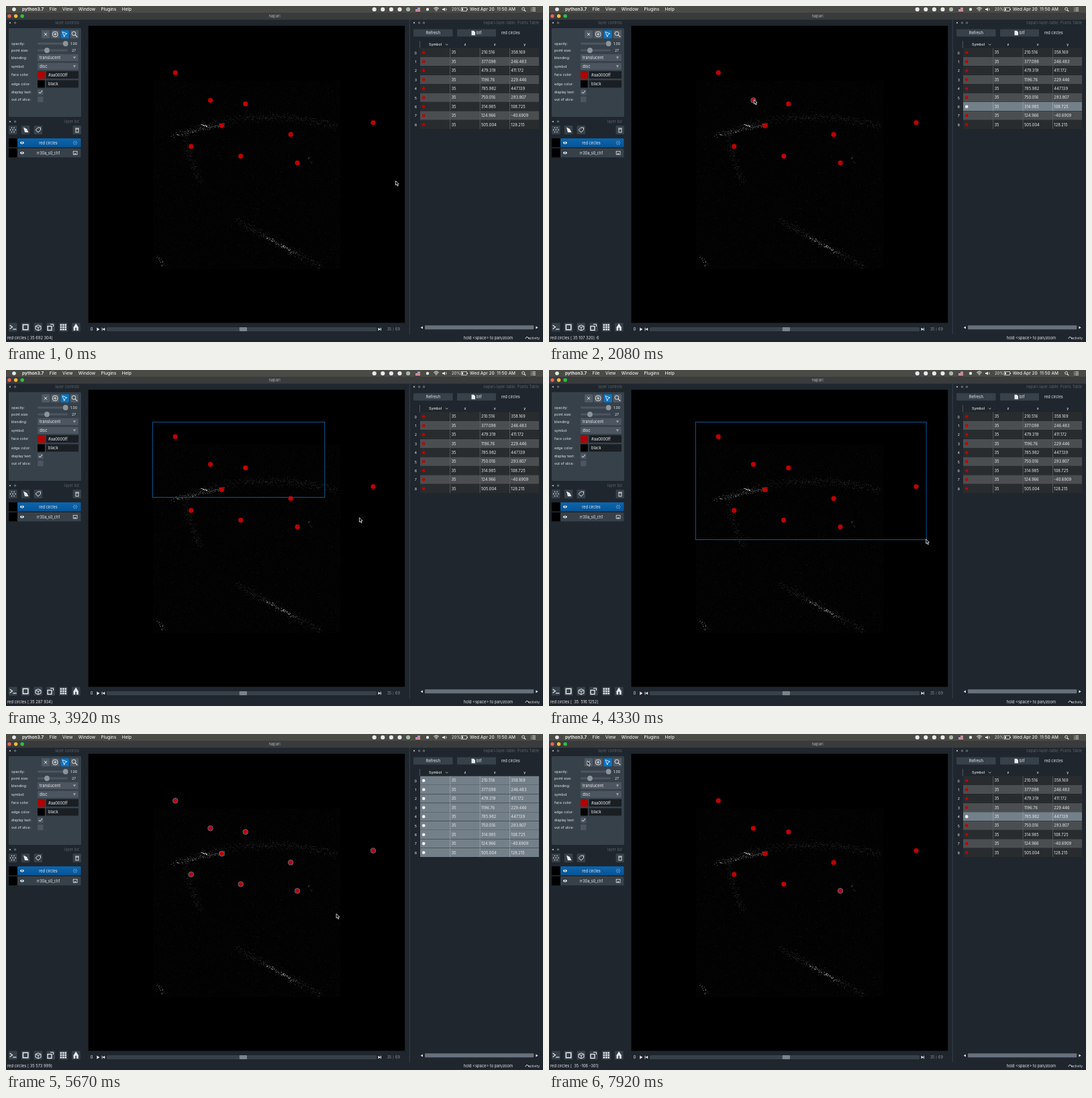
An HTML page with a canvas for the animation above (8 s loop, 800x500 px).

```html
<!DOCTYPE html>
<html lang="en">
<head>
<meta charset="utf-8">
<title>Points table</title>
<style>
html, body { margin: 0; width: 100%; height: 100%; overflow: hidden; background: #000; }
canvas { display: block; width: 800px; height: 500px; }
</style>
</head>
<body>
<canvas id="stage" width="800" height="500"></canvas>
<script>
const LOOP = 8000, TICK = 1000 / 12;
const BG = '#1f262d', PANEL = '#37414a', FIELD = '#4d5660', WHITE = '#e8eaec', DIM = '#5b636c', RED = '#c00000';
const FONT = 'Inter, "Open Sans", sans-serif';
const base = document.createElement('canvas');
base.width = 800;
base.height = 500;
let g = base.getContext('2d');

// x and y in image units; the row number is the index
const points = [
  [210.516, 358.169], [377.098, 246.483], [479.319, 411.172], [1196.76, 229.446], [785.982, 447.139],
  [750.016, 293.807], [314.985, 108.725], [124.966, -40.6909], [505.004, 128.215]
];
const SCALE = 0.275, OX = 217.9, OY = 110.6;
const toScreen = ([x, y]) => [OX + x * SCALE, OY + y * SCALE];

const smooth = u => u * u * (3 - 2 * u);
const easeOut = power => u => 1 - (1 - u) ** power;
const fling = [easeOut(4.069), easeOut(3.036)];

// pointer moves: first tick, last tick, target x and y, easing per axis
const START = [301.5, 300.9];
const moves = [
  [-1, 0, 581, 260.8],
  [0, 4, 570, 236],
  [7, 14, 424.5, 192],
  [17, 24, 305.9, 140],
  [31, 39, 218.4, 77.5],
  [44, 51, 562.2, 252.5, fling],
  [60, 67, 492.6, 268.2],
  [70, 77, 441.75, 237.9],
  [77, 80, 434, 233.5],
  [82, 89, 135.1, 81.45],
  [89, 95, 57.5, 40.8, fling]
];
const ALL = points.map((_, i) => i);
const selections = [[0, []], [14, [5]], [24, [6]], [39, []], [57, ALL], [72, []], [82, [4]]];

function rect(x, y, w, h, color, r = 0) {
  g.fillStyle = color;
  g.beginPath();
  g.roundRect(x, y, w, h, r);
  g.fill();
}

function frameRect(x, y, w, h, color = WHITE, width = 1) {
  g.strokeStyle = color;
  g.lineWidth = width;
  g.strokeRect(x, y, w, h);
}

function disc(x, y, r, color = WHITE) {
  g.fillStyle = color;
  g.beginPath();
  g.arc(x, y, r, 0, 7);
  g.fill();
}

function ring(x, y, r, color = WHITE, width = 0.9, from = 0, to = 7) {
  g.strokeStyle = color;
  g.lineWidth = width;
  g.beginPath();
  g.arc(x, y, r, from, to);
  g.stroke();
}

function trace(pts, closed) {
  g.beginPath();
  for (let i = 0; i < pts.length; i += 2) g.lineTo(pts[i], pts[i + 1]);
  if (closed) g.closePath();
}

function line(pts, color = WHITE, width = 0.9, closed = false) {
  trace(pts, closed);
  g.strokeStyle = color;
  g.lineWidth = width;
  g.stroke();
}

function poly(pts, color = WHITE) {
  trace(pts, true);
  g.fillStyle = color;
  g.fill();
}

// isosceles triangle around a centre; dx, dy give the direction of the tip
function arrow(x, y, dx, dy, size, color = WHITE) {
  const px = -dy * size * 1.25, py = dx * size * 1.25;
  dx *= size;
  dy *= size;
  poly([x + dx, y + dy, x - dx + px, y - dy + py, x - dx - px, y - dy - py], color);
}

function cross(x, y, r, color = WHITE) {
  line([x - r, y - r, x + r, y + r], color);
  line([x - r, y + r, x + r, y - r], color);
}

function lens(x, y, r) {
  ring(x, y, r);
  line([x + r * 0.7, y + r * 0.7, x + r * 1.8, y + r * 1.8], WHITE, 1.1);
}

function text(s, x, y, size = 5.8, color = WHITE, align = 'left', weight = 400) {
  g.font = `${weight} ${size}px ${FONT}`;
  g.textAlign = align;
  g.fillStyle = color;
  g.fillText(s, x, y + size * 0.36);
  return g.measureText(s).width;
}

function randomizer(seed) {
  return () => {
    seed = (seed * 1664525 + 1013904223) >>> 0;
    return seed / 4294967296;
  };
}

function menuBar() {
  rect(0, 0, 800, 10, '#4a4b45');
  rect(0, 10, 800, 10.5, '#393b3d');
  disc(12, 5, 2.8);
  let x = 24;
  'python3.7 File View Window Plugins Help'.split(' ').forEach((s, i) => {
    x += text(s, x, 5, 6.5, WHITE, 'left', i ? 500 : 700) + 8.4;
  });
  ['#ee5f56', '#f4bd2e', '#28c53f'].forEach((c, i) => disc(5 + i * 9.6, 15, 2.7, c));
  text('napari', 400, 15, 5.8, '#aeb2b6', 'center');

  for (let i = 0; i < 5; i++) disc(548.7 + i * 12.6, 5, 3.1, i < 4 ? WHITE : '#a9b8aa');
  for (let i = 0; i < 6; i++) rect(610, 2 + i, 7, 1, i % 2 ? '#d9d4d4' : '#b8474d');
  rect(610, 2, 3, 3, '#35508e');
  disc(628, 5, 2.2);
  for (const r of [0.6, 2.2, 4, 5.7]) ring(641, 8, r, WHITE, 1, -2.3, -0.84);
  rect(650, 4, 2, 2, WHITE);
  arrow(652, 5, -1, 0, 2);
  ring(653.8, 5, 2.2, WHITE, 0.9, -0.8, 0.8);
  text('20%', 664, 5);
  frameRect(678, 2.6, 8.6, 4.8, WHITE, 0.7);
  rect(679, 3.5, 2, 3, WHITE);
  rect(687.2, 4, 0.8, 2, WHITE);
  text('Wed Apr 20  11:50 AM', 759, 5, 6.5, WHITE, 'right', 500);
  lens(770.6, 4.4, 2);
  for (let y = 2.8; y < 8; y += 2.2) {
    rect(782, y - 0.4, 1, 0.9, WHITE);
    rect(784, y - 0.4, 5, 0.9, WHITE);
  }
}

function dockHeader(x, title, right, y = 25) {
  cross(x, y, 1.2, '#b4b8bc');
  ring(x + 7.5, y, 1.2, '#a0a5aa', 0.7);
  text(title, right, y, 5.6, DIM, 'right');
}

function slider(y, at, value) {
  rect(47, y - 1.4, 45, 2.8, FIELD, 1.4);
  disc(at, y, 3.9, '#8c949c');
  text(value, 101, y, 5.3, WHITE, 'center');
}

function combo(y, value) {
  rect(47, y - 5.2, 61, 10.3, FIELD, 1.2);
  text(value, 50, y, 5.9);
  arrow(102, y, 0, 1, 1.8, '#9aa1a8');
}

function swatch(y, color, value) {
  rect(47, y - 5.5, 10.8, 11, color);
  rect(59.6, y - 5.5, 48.4, 11, '#1a1f24', 1);
  text(value, 63, y);
}

function checkbox(y, on) {
  rect(47, y - 4.3, 8.6, 8.6, FIELD, 1);
  if (on) line([49, y, 50.7, y + 2, 54, y - 2], WHITE, 1);
}

function controls() {
  dockHeader(6, 'layer controls', 109);
  rect(4, 33, 108, 132, PANEL, 1.5);
  for (let i = 0; i < 4; i++) rect(53 + i * 14.2, 36, 12.5, 12.3, i === 2 ? '#0873c4' : '#505a64', 1.3);
  cross(59.1, 42.1, 2.1);
  ring(73.2, 42, 4);
  line([73.2, 39.7, 73.2, 44.3]);
  line([70.9, 42, 75.5, 42]);
  line([84, 38.5, 91, 41.2, 87.8, 42.5, 86.8, 46], WHITE, 0.9, true);
  lens(101, 41, 2.9);

  const rows = [
    ['opacity:', 56, y => slider(y, 88.7, '1.00')],
    ['point size:', 66, y => slider(y, 61, '27')],
    ['blending:', 77, y => combo(y, 'translucent')],
    ['symbol:', 90, y => combo(y, 'disc')],
    ['face color:', 102.5, y => swatch(y, '#b00000', '#aa0000ff')],
    ['edge color:', 116, y => swatch(y, '#000', 'black')],
    ['display text:', 128, y => checkbox(y, true)],
    ['out of slice:', 139, y => checkbox(y, false)]
  ];
  for (const [label, y, widget] of rows) {
    text(label, 8, y, 5.3);
    widget(y);
  }
}

function dotCircle(x, y, r) {
  for (let a = 0; a < 6; a++) disc(x + r * Math.cos(a * 1.047), y + r * Math.sin(a * 1.047), r * 0.22);
  disc(x, y, r * 0.22);
}

function button(x, y) {
  rect(x, y, 12.6, 13, PANEL, 1.3);
}

function layerRow(y, name, fill) {
  rect(4, y, 13, 13.2, '#000');
  rect(17, y, 94.5, 13.2, fill, 1);
  g.fillStyle = WHITE;
  g.beginPath();
  g.ellipse(24, y + 6.6, 2.9, 1.8, 0, 0, 7);
  g.fill();
  disc(24, y + 6.6, 1, '#30506c');
  text(name, 63, y + 6.6, 5.6, WHITE, 'center');
}

function layerList() {
  dockHeader(6, 'layer list', 109, 172);
  for (let i = 0; i < 3; i++) button(4 + i * 18.8, 178);
  button(99.5, 178);
  dotCircle(10.3, 184.4, 3.6);
  poly([26, 180.5, 31, 183, 33.5, 188, 28, 188]);
  line([44, 184.5, 47.5, 181, 51.5, 181, 51.5, 184.5, 48, 188], WHITE, 0.9, true);
  line([103, 182, 109, 182]);
  frameRect(104, 183, 4, 5, WHITE, 0.9);

  const blue = g.createLinearGradient(0, 197, 0, 210);
  blue.addColorStop(0, '#0a66b0');
  blue.addColorStop(1, '#085494');
  layerRow(197, 'red circles', blue);
  layerRow(212, 'rr30a_s0_ch1', PANEL);
  dotCircle(103, 203.6, 2.6);
  frameRect(100.2, 216.2, 5.8, 4.8, WHITE, 0.8);
  arrow(103, 219.6, 0, -1, 1.2);
}

function viewerButtons() {
  for (let i = 0; i < 6; i++) button(4 + i * 18.8, 471.5);
  line([5.6, 475, 9.5, 477.7, 5.6, 480.4], WHITE, 1.2);
  line([10.2, 481, 15.5, 481], WHITE, 1.2);
  frameRect(25.4, 474.3, 7.4, 7.4, WHITE, 1.5);
  line([44, 476.5, 48, 474.8, 52, 476.5, 52, 481, 48, 483, 44, 481], WHITE, 1, true);
  line([44, 476.5, 48, 478.3, 52, 476.5]);
  line([48, 478.3, 48, 483]);
  frameRect(62, 476.5, 6, 6, WHITE, 1.3);
  line([66, 473.6, 70.5, 473.6, 70.5, 477], WHITE, 1);
  for (let i = 0; i < 9; i++) rect(80.7 + (i % 3) * 3.4, 473.3 + Math.floor(i / 3) * 3.4, 2.5, 2.5, WHITE);
  arrow(104.2, 475.5, 0, -1, 3.2);
  rect(100.6, 478, 2.7, 5, WHITE);
  rect(105.1, 478, 2.7, 5, WHITE);
}

// speckle scattered along y = curve(x)
function fibre(rnd, from, to, curve, count, spread, level) {
  const off = () => (rnd() + rnd() + rnd() - 1.5) * spread;
  for (let i = 0; i < count; i++) {
    const x = from + (to - from) * rnd();
    rect(Math.round(x + off()), Math.round(curve(x) + off()), 1, 1, `rgba(255,255,255,${level * rnd() ** 2})`);
  }
}

function microscopy() {
  rect(122.6, 29.6, 471.6, 442, '#000');
  const rnd = randomizer(11);
  rect(219, 111, 279, 280, '#020202');
  for (let i = 0; i < 8000; i++)
    rect(219 + Math.floor(rnd() * 279), 111 + Math.floor(rnd() * 280), 1, 1, `rgba(255,255,255,${0.05 * rnd() ** 2})`);
  const arc = x => 165 + ((x - 392) / 130) ** 2 * 24;
  const branch = x => 190 + (x - 262) * 2.8;
  const lower = x => 317 + (x - 340) * 0.55;
  fibre(rnd, 262, 496, arc, 1300, 7, 0.13);
  fibre(rnd, 262, 288, branch, 350, 6, 0.13);
  fibre(rnd, 340, 470, lower, 650, 6, 0.17);
  fibre(rnd, 247, 325, x => 190 - (x - 258) * 0.2, 240, 3, 0.4);
  fibre(rnd, 291, 301, x => 176 + (x - 291) * 0.25, 30, 2, 0.85);
  fibre(rnd, 388, 433, x => lower(x) + 0.8, 110, 2.4, 0.65);
  fibre(rnd, 226, 235, x => 372 + (x - 226) * 1.5, 45, 3, 0.4);
  fibre(rnd, 451, 453, x => 223 + (x - 451) * 5, 14, 2, 0.35);
}

function dimsSlider() {
  const y = 481;
  text('0', 127.5, y, 5.8, WHITE, 'center');
  arrow(137.4, y, 1, 0, 2.1);
  rect(142.7, y - 2.3, 0.9, 4.6, WHITE);
  arrow(145.5, y, -1, 0, 1.8);
  rect(150, y - 3, 402, 6, PANEL, 1);
  rect(347.7, y - 3, 11.3, 6, '#7a838c', 1);
  arrow(556.3, y, 1, 0, 1.8);
  rect(558, y - 2.3, 0.9, 4.6, WHITE);
  text('35', 571, y, 5.5, '#8b9299', 'center');
  rect(576.7, y - 2.5, 0.6, 5, '#6d747b');
  text('69', 583.5, y, 5.5, '#8b9299', 'center');
}

const rowY = i => 69.3 + i * 13.4;
const COLUMN = 44.4;

function tableDock() {
  rect(600.8, 20.5, 1, 468, PANEL);
  dockHeader(608, 'napari-layer-table: Points Table', 794);
  ring(622.5, 25, 1.2, '#a0a5aa', 0.7);
  rect(607, 34.5, 58.5, 11, PANEL, 1);
  rect(672, 34.5, 58, 11, PANEL, 1);
  text('Refresh', 636.3, 40, 5.8, WHITE, 'center');
  poly([693.5, 36.7, 697, 36.7, 699, 38.7, 699, 43.5, 693.5, 43.5]);
  text('btf', 701, 40, 5.9);
  text('red circles', 738, 40, 5.6);
  ['Symbol', 'z', 'x', 'y'].forEach((s, i) => text(s, 639.5 + i * COLUMN, 57.3, 5.3, WHITE, 'center', 500));
  line([655, 56.5, 656.7, 58.2, 658.4, 56.5], WHITE, 0.7);
  rect(616, 52, 0.8, 10.5, '#59626b');
  points.forEach((_, i) => text(String(i), 610.3, rowY(i) + 0.3, 5.4, WHITE, 'center'));
  arrow(619.3, 478.5, -1, 0, 1.6);
  rect(624, 475.3, 162.3, 6, '#66717c', 1);
  arrow(791, 478.5, 1, 0, 1.6);
}

function tableRows(chosen) {
  points.forEach(([x, y], i) => {
    const on = chosen.includes(i), mid = rowY(i);
    rect(617, mid - 6.6, 177, 13, on ? '#748089' : i % 2 ? '#4b4e50' : '#292c2f');
    for (let k = 1; k < 4; k++) rect(616.9 + k * COLUMN, mid - 6.6, 0.8, 13, on ? '#99a2a9' : '#5c6063');
    disc(622.2, mid, 2.3, on ? '#f4f4f4' : RED);
    [35, x, y].forEach((v, k) => text(String(v), 663.5 + k * COLUMN, mid));
  });
}

function pointer(tick) {
  let p = START;
  for (const [from, to, x, y, [easeX, easeY] = [smooth, smooth]] of moves) {
    if (tick <= from) break;
    const u = Math.min(1, (tick - from) / (to - from));
    p = [p[0] + (x - p[0]) * easeX(u), p[1] + (y - p[1]) * easeY(u)];
  }
  return p;
}

// the viewer reacts one tick after the pointer, and only over its canvas
function tracked(tick) {
  let k = tick - 1, p = pointer(k);
  while (k > -1 && (p[0] < 123 || p[0] > 594)) p = pointer(--k);
  return p;
}

function status([x, y]) {
  const nums = [35, Math.round((y - OY) / SCALE), Math.round((x - OX) / SCALE)].map(String);
  const width = Math.max(3, ...nums.map(s => s.length));
  const over = points.findIndex(p => {
    const [px, py] = toScreen(p);
    return Math.hypot(px - x, py - y) < 3.7;
  });
  return `red circles [${nums.map(s => s.padStart(width)).join(' ')}]` + (over < 0 ? '' : ': ' + over);
}

function cursor([x, y]) {
  g.save();
  g.translate(x - 0.5, y - 0.8);
  const shape = [0, 0, 0, 6.6, 1.5, 5.3, 2.7, 8, 3.8, 7.5, 2.7, 5, 4.7, 4.9];
  poly(shape, '#0a0a0a');
  line(shape, '#eee', 0.8, true);
  g.restore();
}

function render(ms) {
  const tick = Math.floor((ms + 4) / TICK) % 96;
  const chosen = selections.filter(s => s[0] <= tick).pop()[1];
  const seen = tracked(tick);
  g.drawImage(base, 0, 0);
  points.forEach((p, i) => {
    const [x, y] = toScreen(p);
    disc(x, y - 0.2, 3.6, RED);
    if (chosen.includes(i)) ring(x, y - 0.2, 3.8, '#5f7c98');
  });
  if (tick >= 45 && tick < 57) {
    const [x, y] = pointer(44);
    frameRect(x, y, seen[0] - x, seen[1] - y, '#0c5696');
  }
  tableRows(chosen);
  text(status(seen), 2, 493.6, 5.75);
  cursor(pointer(tick));
}

rect(0, 0, 800, 500, BG);
menuBar();
controls();
layerList();
viewerButtons();
microscopy();
dimsSlider();
tableDock();
text('hold <space> to pan/zoom', 755, 493.6, 5.75, WHITE, 'right');
line([773.5, 495, 776.3, 492, 779, 495], WHITE, 1);
text('activity', 795, 493.8, 5, WHITE, 'right');

g = document.getElementById('stage').getContext('2d');
const start = performance.now();
function frame() {
  render((performance.now() - start) % LOOP);
  requestAnimationFrame(frame);
}
render(0);
requestAnimationFrame(frame);
</script>
</body>
</html>
```
